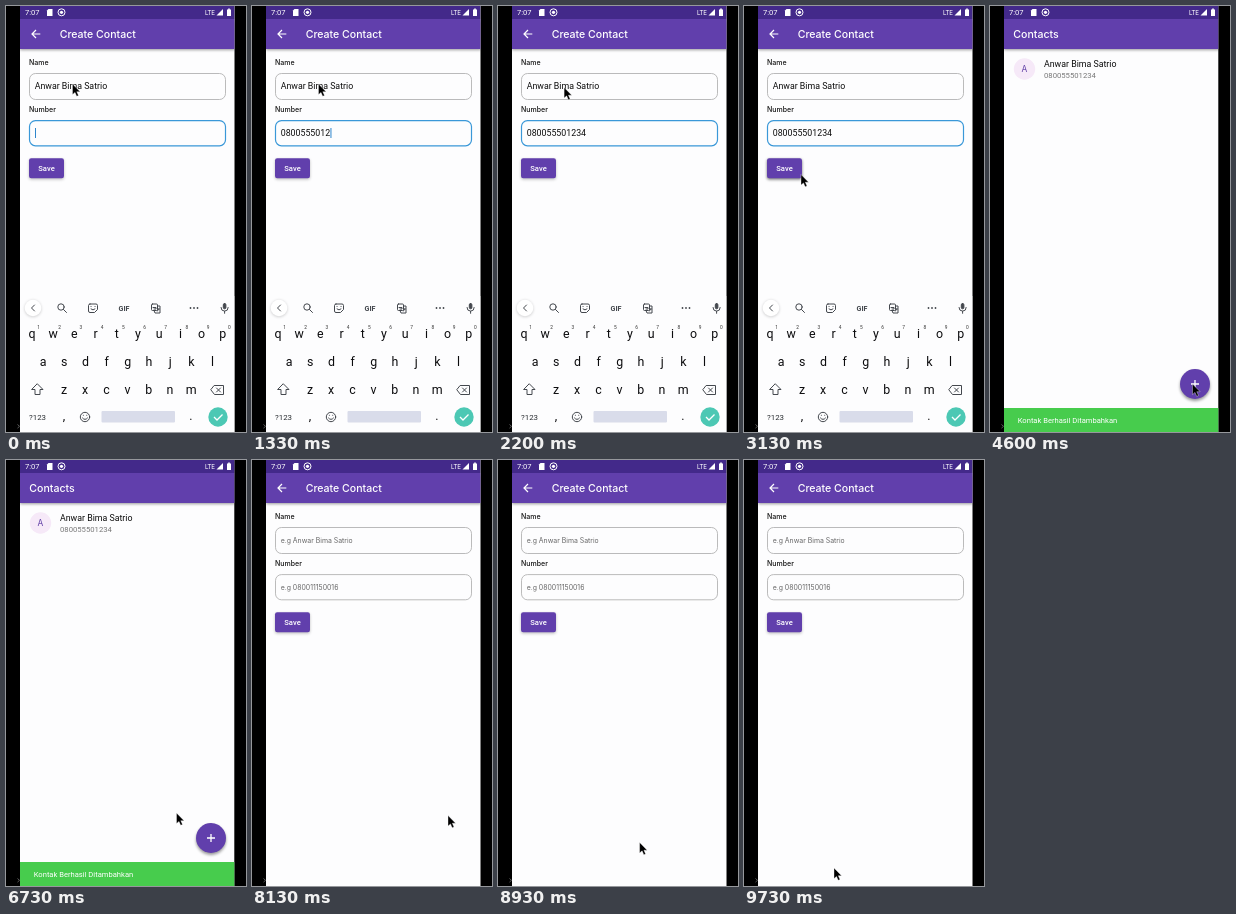
Recreate the animation shown at these times as an HTML page. Size 240 px wide and 426 px high, loop 9790 ms.

```html
<!DOCTYPE html>
<html lang="id">
<head>
<meta charset="utf-8">
<title>Contacts</title>
<style>
html, body { margin: 0; width: 100%; height: 100%; overflow: hidden; background: #000; }
svg { display: block; width: 100%; height: 100%; }
text { font-family: Roboto, sans-serif; white-space: pre; }
.p { font-family: Inter, sans-serif; }
.title { font-size: 10.55px; font-weight: 500; fill: #fff; }
.label { font-size: 7px; font-weight: 500; fill: #111; }
.hint { font-size: 6.9px; fill: #666; }
.val { font-size: 8.8px; fill: #0c0c0c; }
.key { font-size: 12.4px; fill: #0c0c0e; text-anchor: middle; }
.sup { font-size: 4.8px; fill: #333; text-anchor: middle; }
.line { fill: none; stroke: #44484e; stroke-width: 1; stroke-linecap: round; stroke-linejoin: round; }
.page { fill: #fdfdfe; }
.bar { fill: #613fac; }
</style>
</head>
<body>
<svg viewBox="0 0 240 426">
  <defs>
    <clipPath id="screen"><rect x="14" width="214.3" height="426"/></clipPath>
    <filter id="soft" x="-40%" y="-40%" width="180%" height="180%"><feGaussianBlur stdDeviation="1.5"/></filter>
  </defs>
  <rect width="240" height="426" fill="#000"/>
  <path d="M11.5 418.5l2 1.8l-2 1.8" fill="none" stroke="#777" stroke-width=".8"/>
  <g clip-path="url(#screen)">
    <g id="list">
      <rect class="page" x="14" width="215" height="426"/>
      <rect x="14" y="15" width="215" height="29" fill="#000" opacity=".4" filter="url(#soft)"/>
      <rect class="bar" x="14" y="13" width="215" height="30"/>
      <text class="p title" x="23.3" y="32">Contacts</text>
      <circle cx="34.5" cy="63" r="10.7" fill="#f6e9f8"/>
      <text class="p" x="34.5" y="66" font-size="8.4" fill="#6544a8" text-anchor="middle">A</text>
      <text id="listName" class="val" x="54" y="61"></text>
      <text id="sub" x="54" y="72" font-size="7.7" fill="#777"></text>
      <g id="fab">
        <circle cx="205" cy="380" r="15" fill="#000" opacity=".4" filter="url(#soft)"/>
        <circle class="bar" cx="205" cy="378" r="15"/>
        <path d="M201 378h8M205 374v8" stroke="#fff" stroke-width="1.3"/>
      </g>
    </g>
    <g id="form">
      <rect class="page" x="14" width="215" height="426"/>
      <rect x="14" y="15" width="215" height="29" fill="#000" opacity=".4" filter="url(#soft)"/>
      <rect class="bar" x="14" y="13" width="215" height="30"/>
      <path d="M34.3 28H26M30 24l-4 4l4 4" fill="none" stroke="#fff" stroke-width="1.2"/>
      <text class="p title" x="53.7" y="32">Create Contact</text>
      <text class="p label" x="23" y="59">Name</text>
      <rect x="23.5" y="67.5" width="196" height="26" rx="6" fill="none" stroke="#aaa" stroke-width=".8"/>
      <text id="nameText" x="28.7" y="83"></text>
      <text class="p label" x="23" y="106">Number</text>
      <rect id="numBox" x="23.5" y="114.6" width="196" height="25.2" rx="6" fill="none"/>
      <text id="numText" x="28.7" y="130"></text>
      <rect id="caret" y="122" width="1" height="10" fill="#2f86cc"/>
      <rect id="saveShade" x="23" y="153.5" width="35" height="20" rx="2" fill="#000" filter="url(#soft)"/>
      <rect class="bar" x="23" y="152.3" width="35" height="20" rx="2.2"/>
      <text x="40.5" y="165" font-size="7.6" font-weight="500" fill="#fff" text-anchor="middle">Save</text>
    </g>
    <g id="keys">
      <rect class="page" x="14" y="290" width="215" height="136"/>
      <circle cx="27" cy="302.6" r="8.3" fill="#000" opacity=".2" filter="url(#soft)"/>
      <circle cx="27" cy="302" r="8.3" fill="#fff"/>
      <g class="line">
        <path d="M28.5 299l-3 3l3 3"/>
        <circle cx="55" cy="301" r="3.2"/><path d="M57.5 303.5l3 3"/>
        <path d="M84 298h6a1.5 1.5 0 0 1 1.5 1.5v4l-3 3h-4.5a1.5 1.5 0 0 1-1.5-1.5v-5.5a1.5 1.5 0 0 1 1.5-1.5zM85 303q2 2 4 0M85 300.5h.1M89 300.5h.1"/>
        <rect x="145.5" y="298" width="6" height="6.5" rx="1"/>
        <path d="M151.5 300h2.5v7h-5l-1-2.5M147 301.5h3v1.5h-2M151.5 303h2M152.5 303l-1 2"/>
        <rect x="217.3" y="297.5" width="2.6" height="5.3" rx="1.3" fill="#44484e"/>
        <path d="M215 301.5a3.6 3.6 0 0 0 7.2 0M218.6 305.3v2"/>
        <path d="M31.5 378l5.5 5.5h-3v5h-5v-5h-3z"/>
        <path d="M208.5 379.5h9v9h-9l-3.5-4.5zM210.5 382l4 4M214.5 382l-4 4"/>
        <circle cx="79" cy="411" r="4.7"/>
        <path d="M76.5 412q2.5 3 5 0M77.3 409.3h.1M80.7 409.3h.1"/>
      </g>
      <path d="M184.5 302h.01M188 302h.01M191.5 302h.01" stroke="#44484e" stroke-width="1.8" stroke-linecap="round"/>
      <text x="118" y="304.7" font-size="7.2" font-weight="700" fill="#44484e" text-anchor="middle">GIF</text>
      <text x="31.5" y="413.5" font-size="7.9" fill="#2c3034" text-anchor="middle">?123</text>
      <rect x="95.5" y="405" width="73.5" height="11.5" rx="1" fill="#d9dcea"/>
      <circle cx="212" cy="411" r="9.7" fill="#4cc8b4"/>
      <path d="M208 411l3 3l5.5-5.5" fill="none" stroke="#fff" stroke-width="1.3"/>
    </g>
    <g id="snack">
      <rect x="14" y="402" width="215" height="26" fill="#47cc4d"/>
      <text x="27.7" y="416.7" font-size="7.6" fill="#fff">Kontak Berhasil Ditambahkan</text>
    </g>
    <rect x="14" width="215" height="13" fill="#43298a"/>
    <g fill="#fff">
      <text x="19" y="9.3" font-size="7.6">7:07</text>
      <path d="M42.5 3h4v7h-5.5v-5.5z"/>
      <circle cx="55.5" cy="6.3" r="3.5" fill="none" stroke="#fff"/>
      <circle cx="55.5" cy="6.3" r="1.6"/>
      <text x="199" y="9" font-size="6.3">LTE</text>
      <path d="M210.5 9.5h6.5v-6.5z"/>
      <path d="M221 3.5h1.2v-1h1.6v1h1.2v6.5h-4z"/>
    </g>
  </g>
  <path id="mouse" d="M0 0V10.6L2.5 8.4L4.2 12.3L6 11.5L4.3 7.7H7.6Z" fill="#000" stroke="#fff" stroke-width=".35"/>
</svg>
<script>
const LOOP = 9790, FPS = 15;
const NAME = "Anwar Bima Satrio", PHONE = "080055501234", HINT_PHONE = "080011150016";
const KEY_MS = 130, SAVE_AT = 3270, ADD_AT = 7550;
const $ = id => document.getElementById(id);
const clamp = v => Math.max(0, Math.min(1, v));
const ease = v => v * v * (3 - 2 * v);
const ramp = (t, from, len) => ease(clamp((t - from) / len));
const shift = (el, x, y) => el.setAttribute("transform", `translate(${x} ${y})`);
const fade = (el, v) => el.setAttribute("opacity", v);

function addText(cls, x, y, str) {
  const el = document.createElementNS("http://www.w3.org/2000/svg", "text");
  el.setAttribute("class", cls);
  el.setAttribute("x", x);
  el.setAttribute("y", y);
  el.textContent = str;
  $("keys").append(el);
}

[["qwertyuiop", 26, 332], ["asdfghjkl", 37, 360], ["zxcvbnm", 58, 388], [",", 58, 414], [".", 185, 414]]
  .forEach(([row, x, y]) => [...row].forEach((c, i) => addText("key", x + i * 21.2, y, c)));
for (let i = 0; i < 10; i++) addText("sup", 32.5 + i * 21.2, 323.3, (i + 1) % 10);

$("listName").textContent = NAME;
$("sub").textContent = PHONE;

// time, x, y of the pointer
const path = [
  [0, 66.5, 78], [2100, 66.5, 78], [2950, 57, 168.5], [3450, 57, 168.5],
  [4350, 202.5, 378], [5700, 202.5, 378], [6500, 170.5, 353], [6850, 170.5, 353],
  [7350, 203, 377], [7700, 203, 377], [8100, 196, 355.5], [8450, 196, 355.5], [9400, 90, 408], [LOOP, 90, 408]
];

function pointer(t) {
  let i = 1;
  while (i < path.length - 1 && t > path[i][0]) i++;
  const [a, x, y] = path[i - 1], [b, u, v] = path[i];
  const k = ramp(t, a, b - a);
  return [x + (u - x) * k, y + (v - y) * k];
}

function setField(el, value, hint) {
  el.textContent = value || hint;
  el.setAttribute("class", value ? "val" : "p hint");
}

function draw(t) {
  const again = t >= ADD_AT;
  const focused = t < SAVE_AT;
  const count = again ? 0 : Math.min(PHONE.length, Math.floor(t / KEY_MS));
  setField($("nameText"), again ? "" : NAME, "e.g " + NAME);
  setField($("numText"), PHONE.slice(0, count), focused ? "" : "e.g " + HINT_PHONE);

  $("numBox").setAttribute("stroke", focused ? "#3a98d8" : "#aaa");
  $("numBox").setAttribute("stroke-width", focused ? 1.2 : .8);
  $("caret").setAttribute("x", 29 + (count ? $("numText").getComputedTextLength() : 0));
  const idle = Math.max(0, t - PHONE.length * KEY_MS);
  fade($("caret"), +(focused && idle % 1000 < 500));
  fade($("saveShade"), t > 2950 && !again ? .55 : .25);

  const page = again ? ramp(t, ADD_AT, 300) : 1 - ramp(t, SAVE_AT, 300);
  fade($("form"), page);
  shift($("form"), 0, (1 - page) * 70);
  shift($("keys"), 0, ramp(t, SAVE_AT, 230) * 140);

  const snack = ramp(t, 3600, 250) * (1 - ramp(t, 7750, 250));
  shift($("snack"), 0, 25 * (1 - snack));
  shift($("fab"), 0, 24 * (1 - snack));
  shift($("mouse"), ...pointer(t));
}

function tick() {
  const t = performance.now() % LOOP;
  draw(Math.floor((t + 4) * FPS / 1000) * 1000 / FPS);
  requestAnimationFrame(tick);
}
tick();
</script>
</body>
</html>
```
